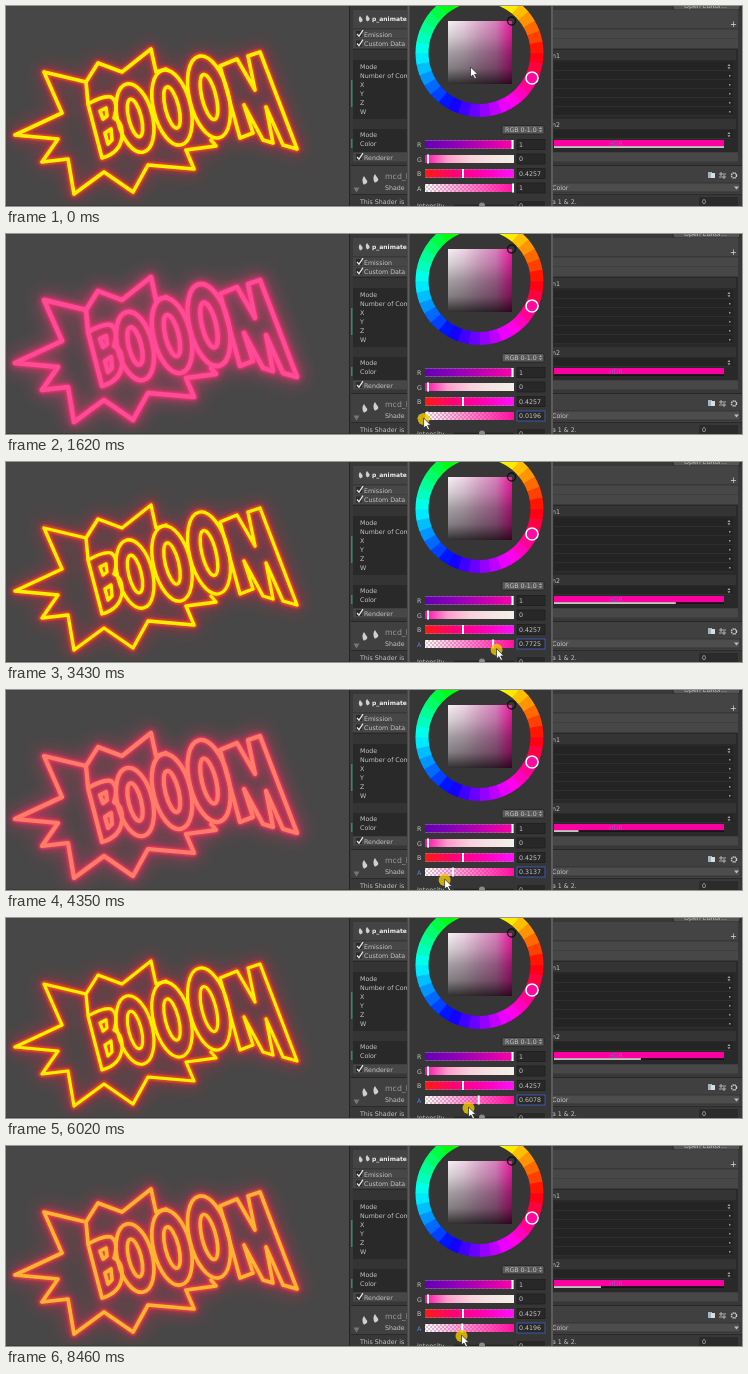
Animation, 736 px wide and 200 px high, one loop 8510 ms. Source, as an HTML page:

```html
<!DOCTYPE html>
<html lang="en">
<head>
<meta charset="utf-8">
<title>Neon colour picker</title>
<style>
  html, body { margin: 0; width: 100%; height: 100%; overflow: hidden; background: #474747; }
  svg { display: block; width: 736px; height: 200px; }
  text { font: 6.3px "DejaVu Sans", sans-serif; fill: #c4c4c4; white-space: pre; }
</style>
</head>
<body>
<svg id="stage" viewBox="0 0 736 200">
  <defs>
    <filter id="blur9" filterUnits="userSpaceOnUse" x="-30" y="0" width="400" height="230"><feGaussianBlur stdDeviation="9"/></filter>
    <filter id="blur3" filterUnits="userSpaceOnUse" x="-30" y="0" width="400" height="230"><feGaussianBlur stdDeviation="3"/></filter>
    <filter id="blur1" filterUnits="userSpaceOnUse" x="-30" y="0" width="400" height="230"><feGaussianBlur stdDeviation=".9"/></filter>
    <filter id="blur0" filterUnits="userSpaceOnUse" x="-30" y="0" width="400" height="230"><feGaussianBlur stdDeviation=".5"/></filter>
    <pattern id="check" width="4" height="4" patternUnits="userSpaceOnUse">
      <path d="M0 0h4v4h-4z" fill="#fff"/><path d="M0 0h2v2h-2zM2 2h2v2h-2z" fill="#d3c8cc"/>
    </pattern>
    <g id="boom" fill="none" stroke-linejoin="round" stroke-linecap="round">
      <path d="M82 97L80 76 38 66 56 107 9 129 52 133 36 156 62 153 68 188 98 166 127 186 142 159 188 163 180 144 210 140 205 134M80 76L92 57 116 66 145 43 150 66 160 63"/>
      <path d="M82 98Q98 89 105 91Q113 96 108 112Q117 116 116 131Q114 147 96 152Z"/>
      <path d="M94 105L100 102 101 110 97 113ZM99 127L105 123 106 134 102 138Z"/>
      <g id="rings"></g>
      <path d="M214 60L231 53 249 84 242 50 254 46 291 143 277 139 260 101 267 137 257 134 238 99 247 127 234 132Z"/>
    </g>
  </defs>
</svg>
<script>
const LOOP = 8510;
const stage = document.getElementById('stage');
const set = (node, attrs) => { for (const k in attrs) node.setAttribute(k, attrs[k]); };
const clamp = v => Math.min(1, Math.max(0, v));
const smooth = (from, to, v) => { const k = clamp((v - from) / (to - from)); return k * k * (3 - 2 * k); };
const lerp = (a, b, k) => a + (b - a) * k;

function add(tag, attrs, parent = stage) {
  const node = document.createElementNS('http://www.w3.org/2000/svg', tag);
  set(node, attrs);
  return parent.appendChild(node);
}
const box = (x, y, width, height, fill, more) => add('rect', { x, y, width, height, fill, ...more });
const line = (d, stroke, w = 1) => add('path', { d, stroke, 'stroke-width': w, fill: 'none' });
function label(x, y, str, style = '') {
  const node = add('text', { x, y, style });
  node.textContent = str;
  return node;
}
function gradient(id, colors, vertical) {
  const g = add('linearGradient', { id, x2: vertical ? 0 : 1, y2: vertical ? 1 : 0 });
  colors.forEach((c, i) => add('stop', { offset: i / (colors.length - 1), 'stop-color': c }, g));
  return `url(#${id})`;
}
const arrows = (x, y) => add('path', { d: `M${x} ${y}l1.5-2 1.5 2zm0 1.2h3l-1.5 2z`, fill: '#aaa' });

// Neon sign: three growing rings between B and M
const rings = document.getElementById('rings');
for (let i = 0; i < 3; i++) {
  const cx = 129 + 37 * i, cy = 112 - 10.5 * i, rx = 17.5 + i, ry = 35 + 3.5 * i;
  const transform = `rotate(-14 ${cx} ${cy})`;
  add('ellipse', { cx, cy, rx, ry, transform }, rings);
  add('ellipse', { cx, cy, rx: rx * .36, ry: ry * .55, transform }, rings);
}
box(0, 0, 345, 200, '#474747');
const [glow, halo, rim, core] = [9, 3, 1, 0].map(b => add('use', { href: '#boom', filter: `url(#blur${b})` }));
box(0, 199, 345, 1, '#3c3c3c');

// Inspector
function header(y, str) {
  box(347, y, 385, 9, '#474747');
  box(350, y + 1.5, 6, 6, '#2b2b2b');
  line(`M351 ${y + 4.5}l2 2.2 4-6`, '#e8e8e8', 1.2);
  label(358, y + 7.2, str);
}
const flame = (x, y, s) =>
  add('path', { d: `M${x} ${y}q${-3 * s} ${4 * s} 0 ${8 * s}q${5 * s} ${-2 * s} 2 ${-5 * s}z`, fill: '#cfcfcf' });
function row(y, name, menu) {
  label(354, y, name);
  box(548, y - 7, 179, 8, '#242424');
  line(`M548 ${y + 1.5}H727`, '#343434', .6);
  if (menu) arrows(721.5, y - 3);
  else box(723, y - 3, 1.5, 1.5, '#999');
}
box(343, 0, 393, 200, '#383838');
line('M343.5 0V200', '#242424');
box(667, -6, 67, 10, '#555', { rx: 2, stroke: '#252525' });
label(678, 2, 'Open Editor...');
box(347, 4, 385, 18, '#444');
flame(354, 10, .8);
flame(361, 9, .8);
label(366, 15.2, 'p_animated', 'font-size:6px;font-weight:bold;fill:#eee');
label(724, 21, '+', 'font-size:8px;fill:#ddd');
header(23.5, 'Emission');
header(33, 'Custom Data');
box(347, 43, 385, 103, '#292929');
[44, 113].forEach((y, i) => {
  box(347, y, 383, 10, '#343434');
  label(546, y + 8, 'n' + (i + 1));
});
['Mode', 'Number of Com', 'X', 'Y', 'Z', 'W'].forEach((name, i) => row(63 + 9 * i, name, !i));
row(131, 'Mode', true);
label(354, 140, 'Color');
box(345, 74, 1.5, 27, '#2f8a72');
box(345, 133, 1.5, 9, '#2f8a72');
box(548, 134, 170, 6.5, '#fa00a0');
box(548, 140.3, 170, 1.5, '#111');
const alphaBar = box(548, 140.3, 170, 1.5, '#f6eef0');
label(603, 140, 'HDR', 'fill:#8f5fb0');
header(146.5, 'Renderer');
line('M345 159.5H736', '#262626');
box(345, 160, 391, 28, '#404040');
flame(358, 170, 1.1);
flame(369, 168, 1.1);
add('path', { d: 'M347.5 181.5h6l-3 5z', fill: '#777' });
label(379, 173, 'mcd_l', 'font-size:7.8px;fill:#999');
label(379, 184, 'Shade');
box(540, 177, 194, 9, '#4d4d4d', { stroke: '#2b2b2b', 'stroke-width': .7 });
label(546, 183.5, 'Color');
add('path', { d: 'M728 180.5h5l-2.5 3z', fill: '#bbb' });
box(702, 166, 4, 6, '#9fb5c4');
box(705, 167, 4, 5, '#ddd');
line('M713 168h7M713 171h7M715 166v4M718 169v4', '#bbb', .9);
add('circle', { cx: 728, cy: 169.5, r: 2.5, fill: 'none', stroke: '#ccc', 'stroke-width': 1.5, 'stroke-dasharray': '1.4 .6' });
line('M345 188.5H736', '#2a2a2a');
label(354, 198, 'This Shader is');
label(546, 198, 'a 1 & 2.');
box(693, 191, 39, 10, '#2b2b2b');
label(696, 198, '0');

// Picker window
box(401, 0, 146, 200, '#363636');
line('M402.5 0V200M546 0V200', '#5c5c5c', 2);
const CX = 473.5, CY = 47, R = 57.5, STEP = 10;
const onWheel = deg => {
  const r = deg * Math.PI / 180;
  return `${(CX + R * Math.cos(r)).toFixed(2)} ${(CY + R * Math.sin(r)).toFixed(2)}`;
};
for (let d = 0; d < 360; d += STEP)
  line(`M${onWheel(d - .3)}A${R} ${R} 0 0 1 ${onWheel(d + STEP + .3)}`, `hsl(${360 - d - STEP / 2} 100% 50%)`, 13);
add('circle', { cx: 526, cy: 72, r: 6, fill: '#ff0aa0', stroke: '#fff', 'stroke-width': 1.6 });
box(442, 15, 64, 63, gradient('sat', ['#f6f0f4', '#ecd4e4', '#dca8cc', '#d880bc', '#f018a0']));
box(442, 15, 64, 63, gradient('val', ['#0000', '#0002', '#0005', '#0007', '#000c'], true));
add('circle', { cx: 505.5, cy: 15, r: 4, fill: 'none', stroke: '#111', 'stroke-width': 1.5 });
box(496, 119.5, 42, 8.5, '#595959', { rx: 1.5, stroke: '#222', 'stroke-width': .8 });
label(499, 126, 'RGB 0-1.0');
arrows(533, 123);

function channel(name, y, value, fill, markX) {
  const tag = label(411, y + 2.5, name);
  box(419, y - 4, 89, 8, 'url(#check)');
  box(419, y - 4, 89, 8, fill);
  const mark = box(markX - 1, y - 4.5, 2, 9, '#fff');
  const field = box(511, y - 5, 28, 10, '#282828', { stroke: '#1f1f1f', 'stroke-width': .8 });
  return { tag, mark, field, text: label(513, y + 2.4, value) };
}
channel('R', 138.5, '1', gradient('red', ['#6400b4', '#8c00b8', '#c400b0', '#ff00a8']), 506.5);
channel('G', 153, '0', gradient('green', ['#ff0aa8', '#ff9ccc', '#f8d0dc', '#f6e4e2', '#f4f0e8']), 422);
channel('B', 167.5, '0.4257', gradient('blue', ['#ff1a10', '#ff0078', '#ff00b4', '#ff10ff']), 457);
const alpha = channel('A', 182, '1', gradient('alpha', ['#ff10a000', '#ff10a055', '#ff10a0aa', '#ff10a0']), 507);
label(411, 202, 'Intensity');
line('M448 199.5H508', '#222', 1.5);
add('circle', { cx: 476, cy: 199.5, r: 3, fill: '#8a8a8a' });
box(511, 195, 28, 10, '#282828');
label(513, 202, '0');

const pointer = add('g', {});
const press = add('circle', { cy: 1, r: 6, fill: '#f2c800', 'fill-opacity': .82 }, pointer);
add('path', { d: 'M0 0v10l2.4-2 1.9 3.8 1.7-.9-1.9-3.6h3.2z', fill: '#fff', stroke: '#222', 'stroke-width': .7 }, pointer);

// Drag strokes along the slider: start ms, end ms, position reached, ease-out power
const PRESS = 550;
const strokes = [
  [600, 1770, -.05, 1.33], [2474, 3698, 1], [3873, 4568, 0], [4788, 5665, .877], [5870, 6080, .5],
  [6100, 6470, .45], [6950, 7490, .49], [7640, 8050, .405], [8280, 8460, .4196],
];
const slide = t => strokes.reduce(
  (pos, [from, to, goal, power = 1]) => lerp(pos, goal, 1 - (1 - clamp((t - from) / (to - from))) ** power), 1);

function draw(t) {
  const a = Math.round(255 * Math.max(0, slide(t))) / 255;
  const held = t >= PRESS;

  // Low alpha is a soft pink tube, high alpha a yellow one.
  const warm = smooth(.15, .6, a);
  const tint = (g0, g1, b0, b1) => `rgb(255,${lerp(g0, g1, warm) | 0},${lerp(b0, b1, warm) | 0})`;
  set(core, { stroke: tint(75, 240, 150, 0), 'stroke-width': 4.4 - 2 * warm + 1.2 * a });
  set(rim, { stroke: tint(50, 85, 125, 20), 'stroke-width': 6, opacity: .85 });
  set(halo, { stroke: tint(45, 30, 115, 60), 'stroke-width': 9, opacity: lerp(.5, .4, warm) });
  set(glow, { stroke: tint(60, 40, 120, 70), 'stroke-width': 14, opacity: lerp(.4, .27, warm) });

  set(alphaBar, { width: Math.max(0, 212 * a - 42) });
  set(alpha.mark, { x: 418.5 + 87.5 * a });
  set(alpha.field, { stroke: held ? '#3f62c8' : '#1f1f1f' });
  alpha.tag.style.fill = held ? '#5b86e8' : '';
  alpha.text.textContent = a % 1 ? (Math.floor(a * 1e4 + 1e-6) / 1e4).toFixed(4) : a;

  // The pointer runs slightly ahead of the value it sets.
  const reach = smooth(0, PRESS, t);
  const x = lerp(464.5, 419 + 87 * slide(t + 60), reach);
  const y = lerp(61, 184 + 5 * smooth(2500, 4300, t), reach);
  set(pointer, { transform: `translate(${x.toFixed(2)} ${y.toFixed(2)})` });
  set(press, { visibility: held ? 'visible' : 'hidden' });
}

const start = performance.now();
function tick() {
  draw((performance.now() - start) % LOOP);
  requestAnimationFrame(tick);
}
tick();
</script>
</body>
</html>
```
